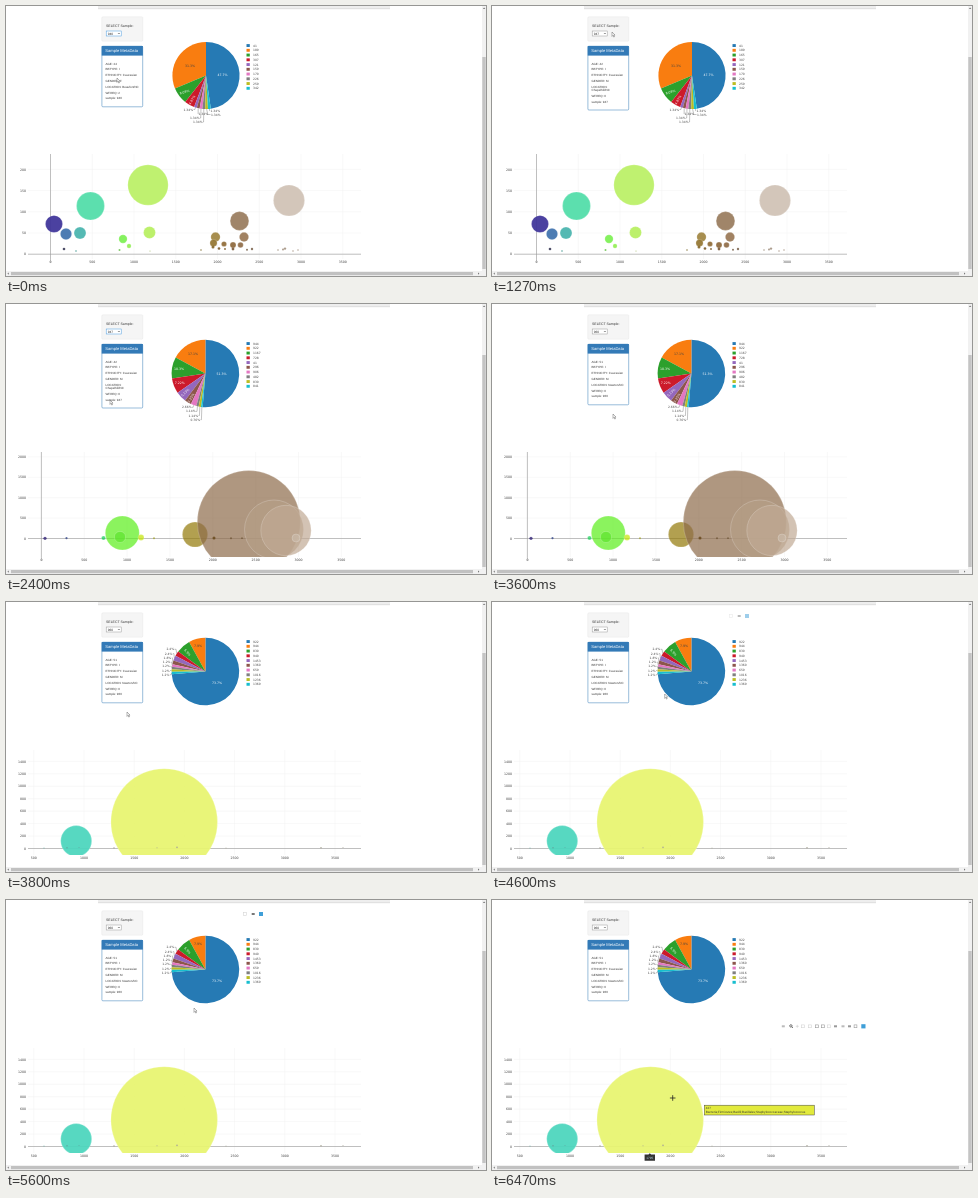
Animation, 480 px wide and 270 px high, one loop 6.54 s. Source, as an HTML page:

```html
<!DOCTYPE html>
<html lang="en">
<head>
<meta charset="utf-8">
<title>Sample dashboard</title>
<style>
html, body { margin: 0; width: 100%; height: 100%; overflow: hidden; background: #fff; }
svg { display: block; width: 480px; height: 270px; }
text { font-family: "DejaVu Sans", sans-serif; text-rendering: geometricPrecision; }
.ui text, text.ui { font-family: "Liberation Sans", Arial, sans-serif; }
</style>
</head>
<body>
<svg id="stage" viewBox="0 0 480 270"></svg>
<script>
const LOOP = 6540;
const PALETTE = ['#267ab4', '#f97d10', '#2ca02c', '#cc1a2b', '#9467bd',
  '#8c564b', '#e377c2', '#7f7f7f', '#bcbd22', '#17becf'];

const text = (x, y, s, size = 3.2, fill = '#444', anchor = 'start', extra = '') =>
  `<text x="${x}" y="${y}" dy=".36em" font-size="${size}" fill="${fill}" text-anchor="${anchor}" ${extra}>${s}</text>`;
const rect = (x, y, w, h, fill, extra = '') =>
  `<rect x="${x}" y="${y}" width="${w}" height="${h}" fill="${fill}" ${extra}/>`;
const line = (x1, y1, x2, y2, stroke, w = .4) =>
  `<path d="M${x1} ${y1}L${x2} ${y2}" stroke="${stroke}" stroke-width="${w}"/>`;
const group = (id, body, extra = '') => `<g id="${id}" ${extra}>${body}</g>`;

// First share runs clockwise from the top, the others counterclockwise.
function pie({ cx, r, shares, names, inside, outside }) {
  const cy = 69.5;
  const at = a => [cx - r * Math.sin(a), cy - r * Math.cos(a)];
  const total = shares.reduce((a, b) => a + b);
  let a = -shares[0] / total * 2 * Math.PI, out = '';
  const first = shares.length - outside.length;
  shares.forEach((s, i) => {
    const b = a + s / total * 2 * Math.PI;
    const [x1, y1] = at(a), [x2, y2] = at(b);
    out += `<path d="M${cx} ${cy}L${x1} ${y1}A${r} ${r} 0 ${b - a > Math.PI ? 1 : 0} 0 ${x2} ${y2}Z" fill="${PALETTE[i]}"/>`;
    if (i >= first) {
      const [label, lx, ly] = outside[i - first];
      const [px, py] = at((a + b) / 2);
      const right = lx > px, end = lx + (right ? -.5 : .5);
      out += `<path d="M${px} ${py}L${px + (end - px) * .3} ${ly}H${end}" fill="none" stroke="#555" stroke-width=".35"/>`;
      out += text(lx, ly, label, 3, '#444', right ? 'start' : 'end');
    }
    a = b;
  });
  for (const [s, x, y, turn = 0, fill = '#fff'] of inside)
    out += text(x, y, s, 3.2, fill, 'middle', `transform="rotate(${turn} ${x} ${y})"`);
  names.forEach((n, i) => {
    const y = 39.5 + i * 4.75;
    out += rect(240.5, y - 1.4, 3.3, 2.9, PALETTE[i]) + text(247, y, n, 3);
  });
  return out;
}

function scatter({ x0, dx, xFrom, y0, dy, yStep, yCount, zeroX, alpha = .94, bubbles, dots }) {
  let out = '';
  for (let i = 0; i < 8; i++) {
    const x = x0 + i * dx;
    if (x > 345) break;
    out += line(x, 148, x, 253, '#eee') + text(x, 255.6, xFrom + i * 500, 3.2, '#444', 'middle');
  }
  for (let i = 0; i < yCount; i++) {
    const y = y0 - i * dy;
    out += line(22, y, 355, y, '#eee') + text(20, y, i * yStep, 3.2, '#444', 'end');
  }
  if (zeroX) out += line(x0, 148, x0, 257, '#999', .6);
  out += line(22, y0, 355, y0, '#999', .6);
  const marks = [...bubbles, ...dots].map(([x, y, r, c]) =>
    `<circle cx="${x}" cy="${y}" r="${r}" fill="${c}" fill-opacity="${alpha}" stroke="#fff" stroke-opacity=".4" stroke-width="${r > 2 ? .5 : 0}"/>`);
  return out + `<g clip-path="url(#plot)">${marks.join('')}</g>`;
}

const charts = [
  pie({
    cx: 200, r: 33.6,
    shares: [47.7, 31.3, 8.09, 4.87, 1.34, 1.34, 1.34, 1.34, 1.34, 1.34],
    names: [41, 189, 165, 307, 121, 159, 170, 226, 259, 342],
    inside: [['47.7%', 216.5, 69], ['31.3%', 184, 60, 0, '#444'], ['8.09%', 178.5, 86, -15], ['4.87%', 186, 94, -60]],
    outside: [[187, 103.5], [192.5, 108], [193.5, 112], [196.5, 116], [205, 108.5], [204.5, 104.7]].map(p => ['1.34%', ...p])
  }) + scatter({
    x0: 44.5, dx: 41.75, xFrom: 0, y0: 248.2, dy: 21.2, yStep: 50, yCount: 5, zeroX: true,
    bubbles: [[48, 218, 8.6, '#40359a'], [60, 228, 5.7, '#4274ae'], [74, 227, 6, '#4ab5ae'],
      [84.5, 200, 14, '#52dda9'], [142, 179, 20.2, '#bcf168'], [143.5, 226.5, 6, '#b8ef62'],
      [117, 233, 4.2, '#7df055'], [123, 240, 2.2, '#95ee58'], [283, 194.5, 15.6, '#d1c3b6'],
      [233.5, 215, 9.4, '#9a7d60'], [209.5, 231, 4.7, '#a18744'], [207.5, 237, 3.6, '#967834'],
      [218, 238, 2.6, '#936f3a'], [227, 239, 3, '#8f6b40'], [234.5, 239, 2.8, '#926f4a'],
      [238, 231, 4.7, '#9b7a58']],
    dots: [[58, 243, 1.3, '#454560'], [70, 245, .8, '#4a9a94'], [113.5, 244, 1, '#7ac860'],
      [144, 245, .6, '#a8c070'], [195, 244, .8, '#8a7a40'], [207, 241, 1.5, '#8a6c30'],
      [213, 242.5, 1.3, '#806030'], [219, 243, .9, '#806030'], [227, 243, 1.4, '#806040'],
      [241, 243.7, 1, '#85705a'], [246, 243, 1.2, '#85705a'], [272, 244, .8, '#a89888'],
      [277, 243.5, 1, '#a89888'], [279, 242.6, 1.2, '#a89888'], [287, 245, .8, '#b0a090'],
      [292, 244, .8, '#b0a090']]
  }),
  pie({
    cx: 199.4, r: 33.8,
    shares: [51.3, 17.1, 10.3, 7.22, 5.13, 3.25, 2.66, 1.14, 1.14, .76],
    names: [944, 922, 1167, 728, 41, 296, 906, 482, 830, 841],
    inside: [['51.3%', 215.5, 70], ['17.1%', 187, 50, 0, '#444'], ['10.3%', 173, 65],
      ['7.22%', 173.7, 79.3], ['5.13%', 179.3, 88.5, -44], ['3.25%', 185, 94, -59]],
    outside: [['2.66%', 185.5, 103.3], ['1.14%', 189.5, 107.4], ['1.14%', 192, 111.5], ['0.76%', 194, 115.7]]
  }) + scatter({
    x0: 35.4, dx: 42.85, xFrom: 0, y0: 234.5, dy: 20.4, yStep: 500, yCount: 5, zeroX: true, alpha: .7,
    bubbles: [[189, 230.5, 12.6, '#917705'], [242.8, 218, 51.5, '#8e6c4a'], [268, 225.5, 29.5, '#b59f86'],
      [280, 226.5, 25.2, '#c0aa94'], [116.3, 229, 17, '#5bee1b'], [114, 233, 5.6, '#5ee32d'],
      [97.5, 234, 2.1, '#10cf52'], [135, 233.6, 3, '#c2e400'], [290, 234, 4, '#cbbba9']],
    dots: [[39, 234.3, 1.6, '#1a0a68'], [60.5, 234.2, 1.1, '#203480'], [148, 234.2, 1, '#a0a020'],
      [208, 234, 1.5, '#5b3a08'], [225, 234.2, 1, '#6a5030'], [236, 234.2, .9, '#6a5030']]
  }),
  pie({
    cx: 199.4, r: 33.8,
    shares: [73.7, 8, 6.9, 2.4, 2.4, 1.8, 1.2, 1.2, 1.2, 1.2],
    names: [922, 944, 830, 940, 1453, 1360, 659, 1016, 1236, 1369],
    inside: [['73.7%', 211, 80.5], ['7.9%', 192, 44, 0, '#444'], ['6.9%', 181.5, 50.5, 49]],
    outside: [['2.4%', 168, 47.3], ['2.4%', 166.3, 51.6], ['1.8%', 165.2, 55.9], ['1.2%', 164.4, 60.1],
      ['1.2%', 163.8, 64.3], ['1.2%', 163.5, 68.5], ['1.2%', 163.3, 72.8]]
  }) + scatter({
    x0: 27.8, dx: 50.2, xFrom: 500, y0: 246.5, dy: 12.45, yStep: 200, yCount: 8, zeroX: false,
    bubbles: [[158.2, 220, 53.3, '#e8f571'], [70.2, 239, 15.5, '#4dd6bd']],
    dots: [38, 61, 73, 108, 151, 171, 220, 315, 337].map((x, i) =>
      [x, 246 - i % 3 * .3, i % 2 ? .8 : .5, i < 3 ? '#5fa8a0' : '#aaa898'])
  })
];

const people = [
  { id: 940, rows: ['AGE: 24', 'BBTYPE: I', 'ETHNICITY: Caucasian', 'GENDER: F', 'LOCATION: Beaufort/NC', 'WFREQ: 2', 'sample: 940'] },
  { id: 947, rows: ['AGE: 42', 'BBTYPE: I', 'ETHNICITY: Caucasian', 'GENDER: M', 'LOCATION:', 'Chapelhill/NC', 'WFREQ: 0', 'sample: 947'] },
  { id: 960, rows: ['AGE: 51', 'BBTYPE: I', 'ETHNICITY: Caucasian', 'GENDER: M', 'LOCATION: Newton/NC', 'WFREQ: 0', 'sample: 960'] }
];
function person({ id, rows }) {
  let y = 57.6, lines = '';
  for (const row of rows) {
    lines += text(99.5, y, row, 3, '#333');
    y += row === 'LOCATION:' ? 3.2 : 5.8;
  }
  return text(101.8, 27.5, id, 3.2, '#222') +
    rect(95.9, 40.2, 40.8, y - 37.6, '#fff', 'rx="1" stroke="#337ab7" stroke-width=".5"') +
    rect(95.7, 40, 41.2, 9.6, '#337ab7') + text(99.3, 44.9, 'Sample MetaData', 4.1, '#fff') + lines;
}

const page =
  rect(92, 0, 292, 3, '#eee') + line(92, 2.7, 384, 2.7, '#d2d2d2', .6) +
  rect(476, 0, 4, 270, '#f1f1f1') + rect(476.3, 51, 3.4, 212, '#c4c4c4') +
  '<path d="M476.9 3l1.2-1.4 1.2 1.4z" fill="#777"/>' +
  rect(0, 265, 480, 5, '#f1f1f1') + rect(5, 266, 462, 3.2, '#c1c1c1') +
  '<path d="M2.8 266.4l-1.4 1.2 1.4 1.2zM472 266.4l1.4 1.2-1.4 1.2z" fill="#777"/>' +
  rect(95.8, 10.8, 41, 24.4, '#f5f5f5', 'rx="1" stroke="#e3e3e3" stroke-width=".4"') +
  text(100, 19.8, 'SELECT Sample:', 3.5, '#333') +
  rect(100.2, 25, 15, 5, '#fff', 'id="select" stroke-width=".5"') +
  '<path d="M111.9 27l1 1 1-1" fill="none" stroke="#333" stroke-width=".5"/>';

const icon = (x, y, c, open) =>
  open ? rect(x - 1.4, y - 1.4, 2.8, 2.8, 'none', `stroke="${c}" stroke-width=".6"`)
    : rect(x - 1.5, y - 1, 3, 2, c);
const pieBar = icon(239, 14, '#d5d5d5', true) + icon(247.2, 14, '#777') + rect(253, 12, 4, 4, '#3f9fd8');
const plotBar =
  [291.3, 351].map(x => icon(x, 126.3, '#bbb')).join('') +
  [311, 318, 337].map(x => icon(x, 126.3, '#d4d4d4', true)).join('') +
  [325, 331, 363.5].map(x => icon(x, 126.3, '#999', true)).join('') +
  [343.5, 357.5].map(x => icon(x, 126.3, '#999')).join('') +
  '<circle cx="298.9" cy="125.9" r="1.2" fill="none" stroke="#555" stroke-width=".8"/>' + line(299.8, 126.8, 301, 128, '#555', .8) +
  line(303.8, 126.3, 306.8, 126.3, '#ccc', .6) + line(305.3, 124.8, 305.3, 127.8, '#ccc', .6) +
  rect(369.3, 124.2, 4.2, 4.2, '#3f9fd8');
const axisTip = '<path d="M152.6 254.6h3.9l1.3-1.3 1.3 1.3h3.9v6.2h-10.4z" fill="#333"/>' +
  text(157.8, 257.7, '1795', 3.1, '#bfe0ee', 'middle', 'class="ui"');
const tip = rect(212.3, 205.2, 110, 9.8, '#e2ea3c', 'stroke="#444" stroke-width=".5"') +
  text(213.8, 208, '427', 3, '#333') +
  text(213.8, 212.2, 'Bacteria;Firmicutes;Bacilli;Bacillales;Staphylococcaceae;Staphylococcus', 3.1, '#333');

document.getElementById('stage').innerHTML =
  '<defs><clipPath id="plot"><rect x="22" y="148" width="333" height="105"/></clipPath></defs>' +
  `<g class="ui">${page}</g>` +
  people.map((p, i) => group('person' + i, person(p), 'class="ui"')).join('') +
  charts.map((c, i) => group('chart' + i, c)).join('') +
  group('pieBar', pieBar) + group('plotBar', plotBar) + group('axisTip', axisTip) + group('tip', tip, 'class="ui"') +
  group('arrow', '<path d="M0 0v4.4l1-1 .8 1.7.7-.4-.8-1.6h1.3z" fill="#fff" stroke="#444" stroke-width=".4"/>') +
  group('cross', '<path d="M-2.8 0h5.6M0-2.8v5.6" stroke="#222" stroke-width=".8"/>');

// Pointer stops: time, x, y
const stops = [[0, 111, 72], [470, 111, 72], [800, 111, 28], [1130, 119, 26], [1270, 120, 26], [1800, 120, 26],
  [2400, 104, 96], [2670, 104, 96], [2930, 109, 28], [3200, 119, 104], [3470, 119, 104], [3600, 121, 110],
  [4130, 121, 110], [4600, 172.7, 92], [4800, 174, 92], [5100, 186, 126], [5400, 188, 108],
  [5660, 188, 108], [6070, 135, 179], [6200, 180.7, 198], [LOOP, 180.7, 198]];
function pointer(t) {
  const i = stops.findIndex(s => s[0] > t);
  const [t0, x0, y0] = stops[i - 1], [t1, x1, y1] = stops[i];
  const u = (t - t0) / (t1 - t0), e = u * u * (3 - 2 * u);
  return [x0 + (x1 - x0) * e, y0 + (y1 - y0) * e];
}

const el = id => document.getElementById(id);
const show = (id, on) => el(id).setAttribute('visibility', on ? 'visible' : 'hidden');
const stage = (t, a, b) => t < a ? 0 : t < b ? 1 : 2;

function draw(now) {
  const t = now % LOOP;
  const who = stage(t, 870, 3000), chart = stage(t, 1400, 3740);
  for (let i = 0; i < 3; i++) {
    show('person' + i, i === who);
    show('chart' + i, i === chart);
  }
  const focus = t < 870 || (t >= 1800 && t < 3000);
  el('select').setAttribute('stroke', focus ? '#4a9be0' : '#999');
  show('pieBar', t >= 4450 && t < 5860);
  el('pieBar').setAttribute('opacity', Math.max(0, Math.min(1, (t - 4450) / 300)));
  show('plotBar', t >= 5930);
  show('axisTip', t >= 6060);
  show('tip', t >= 6130);
  const [x, y] = pointer(t), inPlot = y > 148;
  show('arrow', !inPlot);
  show('cross', inPlot);
  for (const id of ['arrow', 'cross']) el(id).setAttribute('transform', `translate(${x} ${y})`);
}

const start = performance.now();
function tick() {
  draw(performance.now() - start);
  requestAnimationFrame(tick);
}
tick();
</script>
</body>
</html>
```
